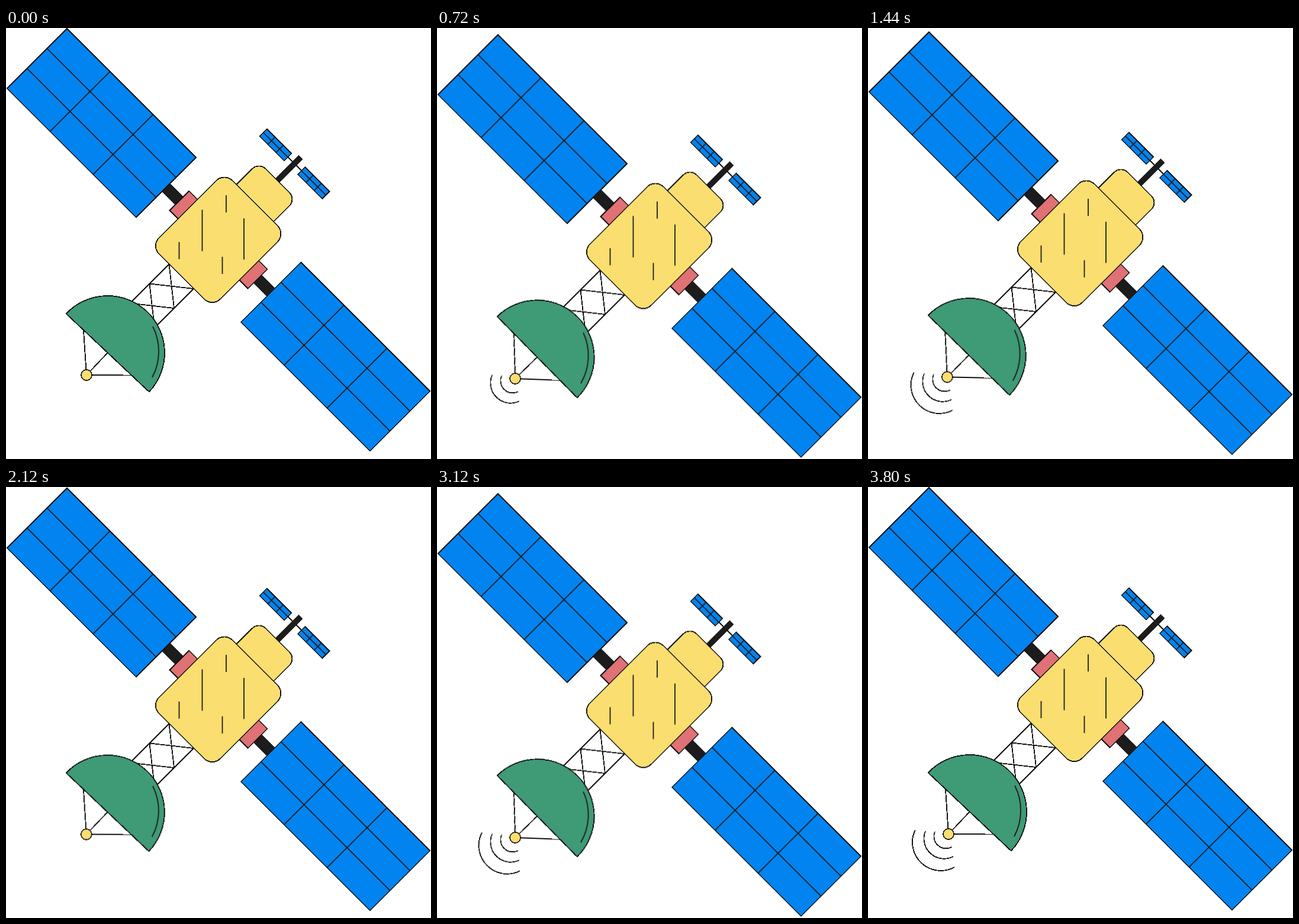
Recreate the animation shown at these times as an HTML page. Size 718x729 px, loop 3.84 s.

```html
<!DOCTYPE html>
<html lang="en">
<head>
<meta charset="utf-8">
<title>Satellite</title>
<style>
  html, body { margin: 0; width: 100%; height: 100%; overflow: hidden; background: #fff; }
  svg { display: block; width: 718px; height: 729px; }
  #sat { stroke: #111; stroke-width: 1.8; fill: none; shape-rendering: crispEdges; }
  .soft { stroke: #1c1c1c; shape-rendering: geometricPrecision; }
  .blue { fill: #0284f0; }
  .gold { fill: #fade70; }
  .pink { fill: #e07174; }
  .green { fill: #3f9a76; }
  .dark { fill: #1c1c1c; stroke: none; }
  #dish { transform-origin: 250px 482px; }
</style>
</head>
<body>
<svg viewBox="0 0 718 729">
  <g id="sat">
    <path id="mast"/>
    <g id="dish">
      <path d="M131 512L136 587L171.5 549.5M136 587L212 587.5"/>
      <path class="green" d="M101.6 483.2A96 96 0 0 1 241.8 615.4Z"/>
      <path class="soft" d="M248 505A93 93 0 0 1 247 591"/>
      <circle class="gold" cx="136" cy="587" r="9"/>
      <path class="wave" d="M113 583A20.5 20.5 0 0 0 141.5 609"/>
      <path class="wave" d="M97 582A34 34 0 0 0 144 625"/>
      <path class="wave" d="M79.5 580.5A48 48 0 0 0 146 643"/>
    </g>
    <g id="hull" transform="translate(359 358.2) rotate(45)">
      <rect class="dark" x="-127" y="-10" width="40" height="20"/>
      <rect class="dark" x="87" y="-10" width="40" height="20"/>
      <rect class="pink" x="-93.6" y="-23.2" width="24" height="46.4"/>
      <rect class="pink" x="69.6" y="-23.2" width="24" height="46.4"/>
      <path d="M-16 -182H16"/>
      <rect class="dark" x="-5.3" y="-197" width="9.6" height="60"/>
      <rect class="gold" x="-44.6" y="-141.2" width="88.8" height="80" rx="16"/>
      <rect class="gold" x="-73.4" y="-87.4" width="146.4" height="175.4" rx="19.3"/>
    </g>
    <path class="soft" d="M372 283v29M331.5 307.5v70M402 322v69.5M292.5 362v29M365.5 387v29"/>
  </g>
</svg>
<script>
  const $ = s => document.querySelector(s);
  const HALF = 960, LOOP = 2 * HALF;

  // Solar panel with evenly spaced grid lines
  function panel(x, y, w, h, cols, rows) {
    let grid = '';
    for (let i = 1; i < cols; i++) grid += `M${x + w * i / cols} ${y}v${h}`;
    for (let i = 1; i < rows; i++) grid += `M${x} ${y + h * i / rows}h${w}`;
    return `<rect class="blue" x="${x}" y="${y}" width="${w}" height="${h}"/>` +
      `<path class="soft" d="${grid}"/>`;
  }

  $('#hull').insertAdjacentHTML('beforeend',
    panel(-433.6, -71.6, 308.4, 143.2, 3, 3) +
    panel(125.4, -71.6, 308.4, 143.2, 3, 3) +
    panel(-74.7, -190.4, 58.6, 17.4, 3, 2) +
    panel(16.4, -190.4, 58.6, 17.4, 3, 2));

  // Lattice mast: two rails and crossing braces
  const left = i => `${275.5 - 33 * i} ${399.5 + 33 * i}`;
  const right = i => `${317 - 33 * i} ${441 + 33 * i}`;
  let mast = `M${left(0)}L${left(2)}M${right(0)}L${right(2)}`;
  for (let i = 0; i < 2; i++)
    mast += `M${left(i)}L${right(i + 1)}M${right(i)}L${left(i + 1)}`;
  $('#mast').setAttribute('d', mast);

  // Bobbing and dish tilt share one swing
  const swing = (el, from, to) => el.animate(
    [{ transform: from }, { transform: to }],
    { duration: HALF, iterations: Infinity, direction: 'alternate', easing: 'cubic-bezier(.5,0,.5,1)' });

  swing($('#sat'), 'translateY(0px)', 'translateY(11.6px)');
  swing($('#dish'), 'rotate(0deg)', 'rotate(2.4deg)');

  // Signal arcs switch on one after another, then all go off
  document.querySelectorAll('.wave').forEach((el, i) => el.animate(
    [
      { opacity: 0, easing: 'step-end' },
      { opacity: 1, offset: (i + 1) / 6, easing: 'step-end' },
      { opacity: 1 }
    ],
    { duration: LOOP, iterations: Infinity }));
</script>
</body>
</html>
```
